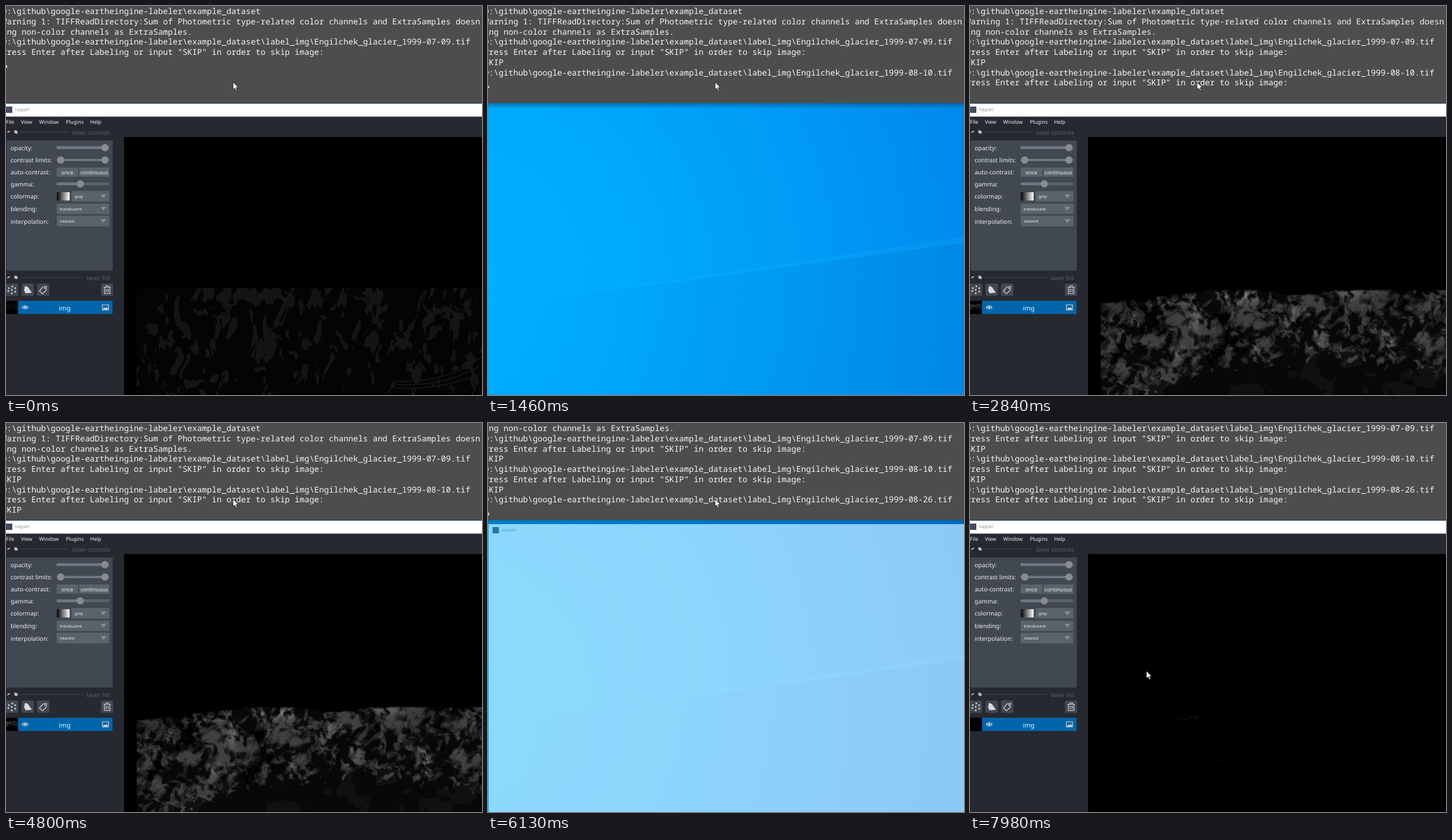
An HTML page with a canvas that plays this animation: 827 px wide and 677 px high, repeating every 8000 ms.

```html
<!DOCTYPE html>
<html lang="en">
<head>
<meta charset="utf-8">
<title>Image labeling session</title>
<style>
  html, body { margin: 0; width: 100%; height: 100%; overflow: hidden; }
  #stage {
    position: relative; width: 827px; height: 677px; overflow: hidden;
    text-rendering: geometricPrecision;
    font-family: "Noto Sans", "Open Sans", sans-serif;
    background: radial-gradient(circle at -60px 470px,
      #00b0ff 0, #00a9fc 330px, #009ef7 560px, #0093f2 760px, #0088e9 960px);
  }
  #stage > * { position: absolute; left: 0; top: 0; }
  #win {
    left: -7px; top: 170px; width: 850px; height: 520px;
    background: #fff; box-shadow: 0 0 6px 1px rgba(0, 40, 100, .6);
  }
  #win i { position: absolute; left: 7px; top: 5px; width: 11px; height: 11px; background: #464a61; }
  #win span { position: absolute; left: 22px; top: 3px; font-size: 8.6px; line-height: 15px; color: #979797; }
  #term { width: 827px; height: 169px; overflow: hidden; background: #4d4d4d; }
  #edge { top: 169px; width: 827px; height: 1px; background: #1d4a63; }
  #log {
    position: absolute; margin: 0; left: -6.95px; color: #f6f6f6;
    font: 500 14.13px/17.73px "Noto Sans Mono", "DejaVu Sans Mono", monospace;
  }
  #caret { position: absolute; width: 8.5px; height: 4.5px; background: #ccc; }
  .lbl { font-size: 10.4px; fill: #f0f1f2; }
  .menu { font-size: 9px; fill: #f0f1f2; }
  .btn { font-size: 9.1px; fill: #f0f1f2; text-anchor: middle; }
  .opt { font-size: 7.2px; fill: #f0f1f2; }
  .head { font-size: 10.4px; fill: #59606a; text-anchor: end; }
  .name { font-size: 11.3px; fill: #f0f1f2; text-anchor: middle; }
  .ctl { fill: #5a626c; }
  .fill { fill: #6f7782; }
  .knob { fill: #888c8f; }
  .icon { fill: none; stroke: #d8dadc; stroke-width: 1.2; }
  .solid { fill: #d8dadc; }
</style>
</head>
<body>
<div id="stage">
  <svg width="827" height="677">
    <defs>
      <linearGradient id="beam"><stop offset="0" stop-color="#0078d8" stop-opacity="0"/><stop offset=".45" stop-color="#0078d8" stop-opacity=".1"/><stop offset="1" stop-color="#0074c8" stop-opacity=".16"/></linearGradient>
      <linearGradient id="shade" x2="0" y2="1"><stop offset="0" stop-color="#003c70" stop-opacity=".5"/><stop offset="1" stop-color="#003c70" stop-opacity="0"/></linearGradient>
    </defs>
    <path d="M0 520L320 482L827 412V677H0Z" fill="url(#beam)"/>
    <path d="M0 517L320 477L827 402V412L320 481L0 519Z" fill="#1ab4ff" opacity=".18"/>
    <rect y="169" width="827" height="10" fill="url(#shade)"/>
  </svg>
  <div id="win"><i></i><span>napari</span></div>
  <svg id="ui" width="827" height="677">
    <defs>
      <linearGradient id="ramp"><stop offset="0"/><stop offset="1" stop-color="#fff"/></linearGradient>
      <clipPath id="heads"><path d="M100 205H190V225H100ZM100 460H190V478H100Z"/></clipPath>
    </defs>
    <path d="M0 192.5H827V677H0Z" fill="#262930"/>
    <path d="M205 228H827V677H205Z"/>
    <g class="menu">
      <text x="0" y="205">File</text><text x="26" y="205">View</text><text x="57.5" y="205">Window</text>
      <text x="104" y="205">Plugins</text><text x="146" y="205">Help</text>
    </g>
    <g class="head" clip-path="url(#heads)">
      <text x="181" y="224">layer controls</text><text x="181" y="477">layer list</text>
    </g>
    <path d="M24 219.5H108M24 472.5H134" stroke="#414851"/>
    <path id="mini" class="icon" d="M2.5 220.5L7 217.5M3 218.5H6M15 217H18V220H15ZM16.5 218.5H19.5V221.5H16.5Z"/>
    <use href="#mini" y="253"/>
    <rect x="1" y="234" width="184.5" height="226.5" rx="2" fill="#414851"/>
    <g class="lbl">
      <text x="8" y="250.5">opacity:</text><text x="8" y="272">contrast limits:</text>
      <text x="8" y="293">auto-contrast:</text><text x="8" y="314">gamma:</text>
      <text x="8" y="335">colormap:</text><text x="8" y="357">blending:</text>
      <text x="8" y="378.5">interpolation:</text>
    </g>
    <g class="ctl">
      <path d="M88 244H179V249H88ZM88 266H179V270H88ZM88 307H179V312H88Z"/>
      <rect x="88" y="281" width="37.5" height="16" rx="1"/><rect x="127" y="281" width="52.5" height="16" rx="1"/>
      <rect x="114" y="322" width="65.5" height="18.5" rx="1"/><rect x="88" y="344" width="91.5" height="18" rx="1"/>
      <rect x="88" y="365" width="91.5" height="18.5" rx="1"/>
    </g>
    <path class="fill" d="M88 244H172V249H88ZM95 266H172V270H95ZM88 307H129V312H88Z"/>
    <g class="knob">
      <circle cx="172" cy="246.5" r="6.3"/><circle cx="95" cy="268" r="6.3"/>
      <circle cx="172" cy="268" r="6.3"/><circle cx="129" cy="309.5" r="6.3"/>
      <path d="M164 328H174.5L169.2 334.5ZM164 349.5H174.5L169.2 356ZM164 371H174.5L169.2 377.5Z"/>
    </g>
    <rect x="88.5" y="324" width="22" height="14.5" fill="url(#ramp)"/>
    <g class="btn"><text x="106.5" y="292.5">once</text><text x="153.5" y="292.5">continuous</text></g>
    <g class="opt"><text x="119" y="334">gray</text><text x="93.5" y="356">translucent</text><text x="93.5" y="377">nearest</text></g>
    <g fill="#414851">
      <rect x="-2" y="483" width="23" height="21.5" rx="2"/><rect x="27" y="483" width="21.5" height="21.5" rx="2"/>
      <rect x="54" y="483" width="21.5" height="21.5" rx="2"/><rect x="165" y="483" width="21" height="21.5" rx="2"/>
    </g>
    <path d="M5 491h0M11 488h0M16 491h0M4 496h0M10 494h0M16 497h0M10 500h0" stroke="#d8dadc" stroke-width="3" stroke-linecap="round"/>
    <path class="solid" d="M33 487L38 489L45 499L34 500L31.5 495Z"/>
    <path class="icon" d="M58 496L64 489L70.5 488L70 494.5L63.5 501Z"/>
    <circle class="solid" cx="67.5" cy="491" r="1.2"/>
    <path class="icon" d="M169.500 489.500H182M173.500 489V487H178V489M171 490V500.5H180.5V490M174 492V498M177.5 492V498"/>
    <path d="M0 513H21V536H0Z"/>
    <path d="M21 513H185V536H21Z" fill="#0066ab"/>
    <text x="102" y="529.5" class="name">img</text>
    <path class="icon" d="M28 524.5Q33 518.5 38.5 524.5Q33 530 28 524.5Z"/>
    <circle class="solid" cx="33.2" cy="524.3" r="1.9"/>
    <path class="icon" d="M167.5 520H178V529H167.5Z"/>
    <path class="solid" d="M168 528.5L171 524.5L173 526.5L175 523.5L177.5 528.5Z"/>
  </svg>
  <canvas width="827" height="677"></canvas>
  <canvas width="827" height="677"></canvas>
  <canvas width="827" height="677"></canvas>
  <div id="term"><pre id="log"></pre><div id="caret"></div></div>
  <div id="edge"></div>
  <svg id="mouse" width="14" height="20" overflow="visible">
    <path d="M.5 .5V13.5L3.5 10.8L5.5 15.3L7.6 14.4L5.7 10H9.5Z" fill="#fff" stroke="#111" stroke-width=".8"/>
  </svg>
</div>
<script>
const $ = id => document.getElementById(id);
const LOOP = 8000, ROW = 17.73, COL = 8.478, ROWS = 8;

// Terminal output; the line being typed follows the finished ones.
const dir = "D:\\github\\google-eartheingine-labeler\\example_dataset";
const file = date => `${dir}\\label_img\\Engilchek_glacier_1999-${date}.tif`;
const ask = 'Press Enter after Labeling or input "SKIP" in order to skip image:';
const log = [
  dir,
  "Warning 1: TIFFReadDirectory:Sum of Photometric type-related color channels and ExtraSamples doesn't",
  "ing non-color channels as ExtraSamples.",
  file("07-09"), ask, "SKIP", file("08-10"), ask, "SKIP", file("08-26"), ask
];

// done: finished lines, win: window opacity, pic: shown image or -1
const steps = [
  [0, { done: 5, typed: "", caret: 1, win: 1, pic: 0, mouse: [394, 132] }],
  [150, { caret: 0 }],
  [520, { typed: "S", caret: 1 }],
  [670, { typed: "SK" }],
  [790, { typed: "SKI" }],
  [910, { typed: "SKIP" }],
  [1190, { caret: 0 }],
  [1340, { done: 6, typed: "", caret: 1 }],
  [1460, { done: 7, win: 0, pic: -1 }],
  [2020, { caret: 0, win: .55 }],
  [2140, { win: .9 }],
  [2260, { win: 1 }],
  [2410, { done: 8 }],
  [2840, { pic: 1 }],
  [3240, { caret: 1 }],
  [3830, { typed: "S" }],
  [4100, { typed: "SK" }],
  [4370, { typed: "SKIP" }],
  [4800, { caret: 0 }],
  [5330, { caret: 1 }],
  [5450, { done: 9, typed: "" }],
  [5600, { done: 10, win: 0, pic: -1 }],
  [6130, { win: .55 }],
  [6250, { win: .9 }],
  [6400, { win: 1 }],
  [6520, { done: 11, caret: 0 }],
  [6920, { pic: 2 }],
  [7340, { caret: 1 }],
  [7590, { mouse: [402, 174] }],
  [7740, { mouse: [385, 275] }],
  [7860, { mouse: [335, 375], caret: 0 }],
  [7980, { mouse: [306, 431] }]
];

// Procedural terrain
const W = 600, H = 186;
const hash = (x, y) => {
  const h = Math.sin(x * 127.1 + y * 311.7) * 43758.5453;
  return h - Math.floor(h);
};
const mix = (a, b, t) => a + (b - a) * t;
const clamp = v => Math.min(1, Math.max(0, v));
function noise(x, y) {
  const i = Math.floor(x), j = Math.floor(y);
  const u = (x - i) ** 2 * (3 - 2 * (x - i)), v = (y - j) ** 2 * (3 - 2 * (y - j));
  return mix(mix(hash(i, j), hash(i + 1, j), u), mix(hash(i, j + 1), hash(i + 1, j + 1), u), v);
}
function fbm(x, y) {
  let sum = 0, amp = .53;
  for (let o = 0; o < 4; o++, amp /= 2, x = x * 2 + 7, y = y * 2 + 3) sum += amp * noise(x, y);
  return sum;
}
const blob = (x, y, cx, cy, rx, ry) => Math.exp(-(((x - cx) / rx) ** 2) - ((y - cy) / ry) ** 2);

// x, y, radii and gain of brighter and darker patches
const patches = [
  [238, 14, 48, 10, 62], [165, 48, 10, 24, 40], [335, 48, 14, 28, 32],
  [268, 80, 6, 3, 170], [502, 92, 10, 26, 60], [420, 9, 30, 9, 45],
  [375, 85, 14, 28, 25], [95, 27, 45, 4, 45], [55, 55, 6, 12, 40],
  [268, 110, 5, 16, 40], [132, 115, 20, 12, 28], [560, 65, 45, 20, 14],
  [520, 22, 40, 14, -30], [30, 25, 60, 20, -25], [210, 90, 22, 14, -20]
];
const shades = [
  (x, y) => {
    const warp = noise(x / 30, y / 30 + 9) * 1.6;
    const n = fbm(x / 10 + warp, y / 20 + 20 - warp);
    const corner = clamp((55 - x * .5 - y) / 20) * .3;
    const fade = blob(x, y, 330, 180, 190, 65) * .14;
    const mound = blob(x, y, 195, 14, 75, 9) * .25;
    return n + mound - fade - corner > .575 ? 20 : 4;
  },
  (x, y) => {
    const warp = fbm(x / 30, y / 30 + 60) * 3;
    const n = fbm(x / 34 + warp * .3, y / 30 + 5), d = fbm(x / 8 + warp, y / 9 + 40 - warp);
    const grain = clamp((d - .3) * 2.6);
    let g = clamp((n * .5 + d * .5 - .44) * 5) * 62 + 4;
    for (const [cx, cy, rx, ry, gain] of patches) g += gain * blob(x, y, cx, cy, rx, ry) * grain;
    const rise = 112 + (x - 340) ** 2 * (x < 340 ? .0009 : .0003) + (d - .5) * 60;
    g = mix(g, 6 + n * 11, clamp((y - rise) / 10));
    const sky = 24 * clamp(1 - x / 190) + 9 * blob(x, 0, 340, 0, 45, 1) + 2;
    return Math.round(g * clamp((y - sky) / 3 + .2) / 8) * 8;
  },
  (x, y) => {
    const near = blob(x, y, 145, 23, 45, 5) + blob(x, y, 203, 95, 5, 7);
    return near > .4 && fbm(x / 5, y / 4) > .58 ? 10 : 0;
  }
];
const pics = [...document.querySelectorAll("canvas")];
pics.forEach((pic, k) => {
  const tile = document.createElement("canvas");
  tile.width = W; tile.height = H;
  const tctx = tile.getContext("2d"), data = tctx.createImageData(W, H);
  for (let i = 0; i < W * H; i++) {
    const g = shades[k](i % W, Math.floor(i / W));
    data.data.set([g, g, g, 255], i * 4);
  }
  tctx.putImageData(data, 0, 0);
  if (k === 0) {
    tctx.strokeStyle = "#151515";
    tctx.lineWidth = 2;
    for (let j = 0; j < 3; j++) {
      tctx.beginPath();
      tctx.moveTo(450, 162 + j * 6);
      tctx.bezierCurveTo(510, 165 + j * 6, 560, 150 + j * 8, 602, 118 + j * 14);
      tctx.stroke();
    }
  }
  const ctx = pic.getContext("2d");
  ctx.drawImage(tile, 227, 491);
  ctx.drawImage(tile, -4, 519, 25, 10);
});

const win = $("win"), caret = $("caret"), mouse = $("mouse");
let last = -1;
function draw() {
  const t = performance.now() % LOOP;
  const count = steps.filter(step => step[0] <= t).length;
  if (count !== last) {
    last = count;
    const s = Object.assign({}, ...steps.slice(0, count).map(step => step[1]));
    const top = Math.max(0, s.done - ROWS);
    $("log").textContent = [...log.slice(0, s.done), s.typed].join("\n");
    $("log").style.top = 1.2 - top * ROW + "px";
    caret.hidden = !s.caret;
    caret.style.left = -6.95 + s.typed.length * COL + "px";
    caret.style.top = 14.6 + (s.done - top) * ROW + "px";
    const away = (1 - s.win) / .45;
    win.style.opacity = s.win;
    win.style.transform = away ? `translate(${8 * away}px, ${6 * away}px)` : "none";
    $("edge").hidden = s.win < 1;
    $("ui").style.display = s.pic < 0 ? "none" : "";
    pics.forEach((pic, k) => pic.hidden = k !== s.pic);
    mouse.style.transform = `translate(${s.mouse[0]}px, ${s.mouse[1]}px)`;
  }
  requestAnimationFrame(draw);
}
draw();
</script>
</body>
</html>
```
